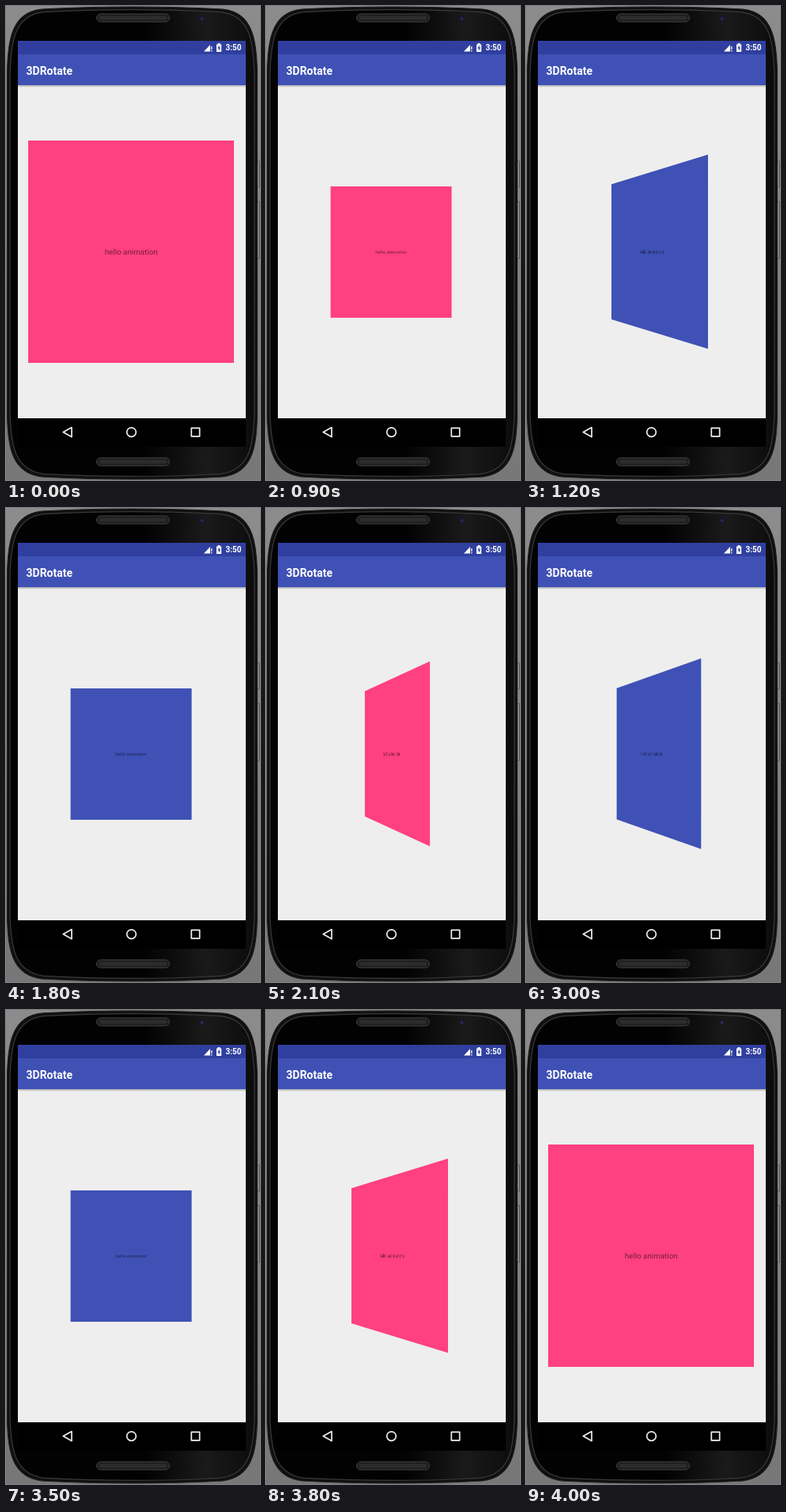
An HTML page for the animation above (4300 ms loop, 321 by 599 pixels).

```html
<!DOCTYPE html>
<html lang="en">
<head>
<meta charset="utf-8">
<title>3DRotate</title>
<style>
  html, body { margin: 0; width: 100%; height: 100%; overflow: hidden; background: #777; }
  #stage { position: relative; width: 321px; height: 599px; overflow: hidden; }
  svg { position: absolute; left: 0; top: 0; }
  text { font-family: Roboto, sans-serif; font-weight: 700; fill: #fff; }
  #scene {
    position: absolute; left: 28.2px; top: 170.3px; width: 260px; height: 281px;
    perspective: 403px;
  }
  #card {
    width: 100%; height: 100%;
    font: 9.8px/281px Roboto, sans-serif; text-align: center; color: rgba(0, 0, 0, .54);
  }
</style>
</head>
<body>
<div id="stage">
  <svg width="321" height="599" viewBox="0 0 321 599">
    <defs>
      <linearGradient id="backdrop" x2="0" y2="1">
        <stop stop-color="#8c8c8c"/><stop offset="1" stop-color="#777"/>
      </linearGradient>
      <linearGradient id="gloss">
        <stop offset=".55" stop-color="#020202"/>
        <stop offset=".8" stop-color="#1a1a1a"/>
        <stop offset="1" stop-color="#0c0c0c"/>
      </linearGradient>
      <linearGradient id="shadow" x2="0" y2="1">
        <stop stop-color="#aaa"/><stop offset="1" stop-color="#eee"/>
      </linearGradient>
      <path id="body" d="M1.5 80C3 40 8 8 45 4Q100 1 159.5 1T274 4C311 8 316 40 317.5 80V520C316 560 311 590 274 595Q219 598 159.5 598T45 595C8 590 3 560 1.5 520Z"/>
      <g id="speaker">
        <rect x="114.5" y="10" width="92" height="10" rx="5" fill="#1c1c1c" stroke="#444"/>
        <rect x="117.5" y="12.5" width="86" height="5" rx="2.5" fill="#2c2c2c"/>
      </g>
    </defs>

    <rect width="321" height="599" fill="url(#backdrop)"/>
    <g fill="#858585" stroke="#444" stroke-width=".7">
      <rect x="316" y="196" width="4.5" height="33" rx="1"/>
      <rect x="316" y="247" width="4.5" height="72" rx="1"/>
    </g>
    <use href="#body" fill="#101010" stroke="#1c1c1c"/>
    <use href="#body" transform="translate(159.5 299.5) scale(.977 .988) translate(-159.5 -299.5)"
         fill="url(#gloss)" stroke="#3a3a3a" stroke-width="1.2"/>
    <use href="#speaker"/>
    <use href="#speaker" y="561"/>
    <circle cx="247.5" cy="16" r="4" fill="#17172b"/>
    <circle cx="247.5" cy="16" r="2" fill="#29294e"/>

    <rect x="15" y="44" width="288" height="513" fill="#000"/>
    <rect x="15" y="100" width="288" height="421" fill="#eee"/>
    <rect x="15" y="100" width="288" height="3" fill="url(#shadow)"/>
    <rect x="15" y="44" width="288" height="17" fill="#303f9f"/>
    <rect x="15" y="61" width="288" height="39" fill="#3f51b5"/>
    <text x="25.5" y="86.5" font-size="14">3DRotate</text>
    <text x="277.5" y="56.3" font-size="10">3:50</text>

    <g fill="#fff">
      <path d="M250 57.5L258 49V57.5Z"/>
      <path d="M259.2 51h1.3v4h-1.3zM259.2 56h1.3v1.5h-1.3z"/>
      <path d="M266 48.5h1.7V47h2.8v1.5h1.7V58H266Z"/>
      <path d="M269.7 49.5L267.2 53.5H268.8V56.8L271.2 52.6H269.7Z" fill="#303f9f"/>
    </g>
    <g fill="none" stroke="#eee" stroke-width="1.7" stroke-linejoin="round">
      <path d="M72.3 538.6L83 532.6V544.6Z"/>
      <circle cx="158.5" cy="538.6" r="5.8"/>
      <rect x="234.3" y="533.4" width="10.4" height="10.4"/>
    </g>
  </svg>
  <div id="scene"><div id="card">hello animation</div></div>
</div>
<script>
  const LOOP = 4300, STEP = 100, FLIP = 500, HALF = 190, DEPTH = 282;
  const PINK = '#ff4081', BLUE = '#3f51b5';
  // Each flip holds its first pose for a short lag.
  const flips = [
    { start: 900, lag: 27 },
    { start: 1800, lag: 53 },
    { start: 2700, lag: 37 },
    { start: 3500, lag: 27 }
  ];
  const card = document.getElementById('card');

  function pose(time) {
    const begun = flips.filter(f => time >= f.start).length;
    const flip = flips[begun - 1];
    const [from, to] = begun % 2 ? [PINK, BLUE] : [BLUE, PINK];
    if (!flip || time >= flip.start + FLIP) return { color: to === BLUE || !flip ? (flip ? BLUE : PINK) : PINK, transform: 'none' };

    const turn = Math.max(0, time - flip.start - flip.lag) / HALF;
    const half = turn < 1 ? 0 : 1;
    const t = Math.min(1, turn - half);
    const angle = 90 * (t - half);   // 0 to 90, then -90 to 0
    return {
      color: half ? to : from,
      transform: `translateZ(${-DEPTH * (1 - t)}px) rotateY(${angle}deg)`
    };
  }

  function draw() {
    const time = performance.now() % LOOP;
    const { color, transform } = pose(Math.floor(time / STEP) * STEP);
    card.style.background = color;
    card.style.transform = transform;
    requestAnimationFrame(draw);
  }
  draw();
</script>
</body>
</html>
```
